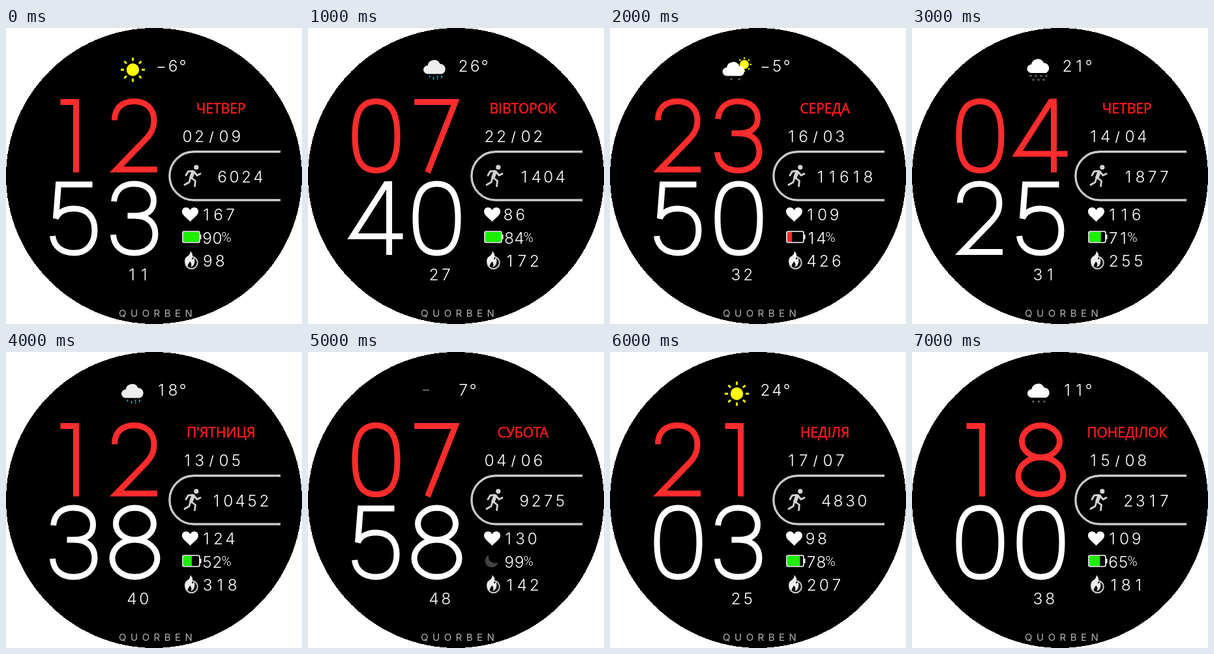
An HTML page that plays this animation: 454x454 px, repeating every 8000 ms.

```html
<!DOCTYPE html>
<html lang="uk">
<head>
<meta charset="utf-8">
<title>Watch face</title>
<style>
  html, body { margin: 0; width: 100%; height: 100%; overflow: hidden; background: #fff; }
  svg { display: block; }
  text { text-anchor: middle; fill: #fff; font: 300 24.5px Inter, sans-serif; }
  .day { font: 400 21px "Open Sans", "Noto Sans", sans-serif; fill: #f51c1c; stroke: #f51c1c; stroke-width: .6; }
  .slash { font-size: 20px; font-weight: 400; }
  .percent { font: 300 21px Roboto, sans-serif; }
  .brand { font-size: 15px; font-weight: 400; letter-spacing: 6.5px; text-anchor: start; fill: #b4b4b4; }
  .line { fill: none; stroke-width: 9; }
</style>
</head>
<body>
<svg width="454" height="454" viewBox="0 0 454 454">
  <circle cx="227" cy="227" r="227" shape-rendering="crispEdges"/>
  <path d="M421 189.8H288A37 37 0 0 0 288 264H421" fill="none" stroke="#c6caca" stroke-width="3.4"/>
  <g fill="none" stroke="#d4d4d4" stroke-width="2.8" stroke-linecap="round" stroke-linejoin="round">
    <circle cx="291.8" cy="213.7" r="3.6" fill="#d4d4d4" stroke="none"/>
    <path d="M287 221L284 229" stroke-width="5.5"/>
    <path d="M288 220L293 226 298 223.500M286 219.300L279.500 220 276 226M284.500 230L290.500 234.500 289.500 242.500M282.500 231L281 236.500 274 240.500"/>
  </g>
  <path d="M282.5 297C276 290 270 287 270 281.5C270 273.5 280.5 273.5 282.5 279.5C284.5 273.5 295 273.5 295 281.5C295 287 289 290 282.5 297Z" fill="#fff"/>
  <circle cx="284.5" cy="360" r="9.3" fill="none" stroke="#ccc" stroke-width="2"/>
  <path d="M282.5 342C289 348 285 352 285 355C287 355 288 353 288 351C291 358 289 365 283 367C285 364 285 361 282 358C281 361 278.500 362 279 366C273 361 273 354 277 351C280 349 283 347 282.5 342Z" fill="#eee"/>
  <text class="brand" x="173" y="443">QUORBEN</text>
  <g id="face"></g>
</svg>
<script>
// Large digits as centre lines, x measured from the middle of the digit
const DIGITS = {
  0: 'M-32.5 57C-32.5 20-22 4 0 4S32.5 20 32.5 57S22 110 0 110S-32.5 94-32.5 57Z',
  1: 'M-21 5H3V113',
  2: 'M-31 33C-31 14-19 4-1 4C18 4 29.5 16 29.5 33C29.5 46 25 54 14 65L-28 108.5H34.5',
  3: 'M-32 31C-30 13-18 4-1 4C18 4 29 15 29 30C29 45 18 53 0 53H-11M0 53C20 53 31.5 64 31.5 81C31.5 98 19 110-1 110C-20 110-32 99-33 82',
  4: 'M20 0V113M17 2L-36 84.5H41',
  5: 'M28 5H-24L-28 57C-24 47-13 42 0 42C20 42 31.5 55 31.5 75C31.5 97 19 110 0 110C-19 110-31 100-33 84',
  7: 'M-34.5 5H28.5L-14 113',
  8: 'M0 4a29 24.5 0 0 1 0 49a29 24.5 0 0 1 0-49ZM0 53a34.5 28.5 0 0 1 0 57a34.5 28.5 0 0 1 0-57Z'
};

const STATES = [
  ['sun', '−6', '12', '53', '11', 'ЧЕТВЕР', '02/09', '6024', '167', 90, '98'],
  ['rain', '26', '07', '40', '27', 'ВІВТОРОК', '22/02', '1404', '86', 84, '172'],
  ['sunSnow', '−5', '23', '50', '32', 'СЕРЕДА', '16/03', '11618', '109', 14, '426'],
  ['snow', '21', '04', '25', '31', 'ЧЕТВЕР', '14/04', '1877', '116', 71, '255'],
  ['rain', '18', '12', '38', '40', "П'ЯТНИЦЯ", '13/05', '10452', '124', 52, '318'],
  ['none', '7', '07', '58', '48', 'СУБОТА', '04/06', '9275', '130', 99, '142'],
  ['sun', '24', '21', '03', '25', 'НЕДІЛЯ', '17/07', '4830', '98', 78, '207'],
  ['lightSnow', '11', '18', '00', '38', 'ПОНЕДІЛОК', '15/08', '2317', '109', 65, '181']
];

const path = (d, color, width = 2) =>
  `<path d="${d}" fill="none" stroke="${color}" stroke-width="${width}"/>`;
const text = (str, x, y, cls = '') => `<text class="${cls}" x="${x}" y="${y}">${str}</text>`;
// Evenly spaced characters; x is the centre of the first
const spaced = (str, x, y, step) => text(str, [...str].map((_, i) => x + i * step).join(' '), y);

const big = (str, y, color) => [...str].map((c, i) =>
  `<path class="line" stroke="${color}" transform="translate(${104.5 + i * 93} ${y})" d="${DIGITS[c]}"/>`).join('');

function sun(x, y, r, inner, outer) {
  let rays = '';
  for (let i = 0; i < 8; i++) {
    const c = Math.cos(i * Math.PI / 4), s = Math.sin(i * Math.PI / 4);
    rays += `M${x + c * inner} ${y + s * inner}L${x + c * outer} ${y + s * outer}`;
  }
  return `<circle cx="${x}" cy="${y}" r="${r}" fill="#ff0"/>` + path(rays, '#ff0', r * 0.3);
}
const cloud = (x, y, color = '#fff') => `<path transform="translate(${x} ${y})" fill="${color}"
  d="M6.5 23a6.5 6.5 0 0 1 0-13A10 10 0 0 1 25.5 7.5A8 8 0 0 1 28.5 23Z"/>`;
const flakes = (xs, y) => path(xs.map(x => `M${x - 2} ${y}h4m-2-2v4`).join(''), '#777', 1);

const WEATHER = {
  sun: () => sun(194.5, 64, 9.7, 13.5, 18.5),
  rain: () => cloud(177, 47.5, '#eee') +
    path('M186.5 73v3M192.5 75v4M198.5 73v3M198.5 77v2M205 73v4', '#16b8cc', 1.6),
  sunSnow: () => sun(206, 56, 7, 8.5, 11) + cloud(172.5, 50.5) + flakes([186, 198], 78.5),
  snow: () => cloud(176.5, 46) + flakes([182, 190, 198, 206], 73.5) + flakes([186, 194, 202], 79.5),
  lightSnow: () => cloud(177, 47) + flakes([186, 194.5, 203], 76),
  none: () => path('M176 58.5H186', '#888', 1.5)
};

function battery(level) {
  if (level > 95) return '<path d="M277 311.5A10 10 0 1 0 291.5 322.5A10 10 0 0 1 277 311.5Z" fill="#444"/>';
  const width = level > 80 ? 24 : Math.max(7, level / 4);
  return `<rect x="272" y="313" width="${width}" height="15" fill="${level < 20 ? '#ff2d2d' : '#1cf000'}"/>
    <rect x="271" y="312" width="26" height="17" rx="2.5" fill="none" stroke="#fff" stroke-width="1.6"/>
    <rect x="297" y="317" width="2.5" height="7" fill="#fff"/>`;
}

function draw([weather, temp, hour, minute, second, day, date, steps, pulse, level, calories]) {
  const [dd, mm] = date.split('/');
  return WEATHER[weather]() +
    spaced(temp, 238, 67.3, 18) + text('°', 235 + temp.length * 18, 67.3) +
    big(hour, 108.5, '#ff2c2c') + big(minute, 235, '#fff') +
    spaced(second, 193, 387.4, 18.8) +
    text(day, 329.7, 130.5, 'day') +
    spaced(dd, 278, 174.7, 18.6) + text('/', 315, 174, 'slash') + spaced(mm, 334, 174.7, 18.8) +
    spaced(steps, 359.3 - (steps.length - 1) * 9.2, 236.5, 18.4) +
    spaced(pulse, 307, 294.6, 18.5) +
    battery(level) + spaced(String(level), 308.5, 330.6, 15.5) + text('%', 338, 327.5, 'percent') +
    spaced(calories, 309.3, 366.3, 19);
}

const face = document.getElementById('face');
let shown = -1;
function tick() {
  const index = Math.floor(performance.now() / 1000) % STATES.length;
  if (index !== shown) face.innerHTML = draw(STATES[shown = index]);
  requestAnimationFrame(tick);
}
tick();
</script>
</body>
</html>
```
